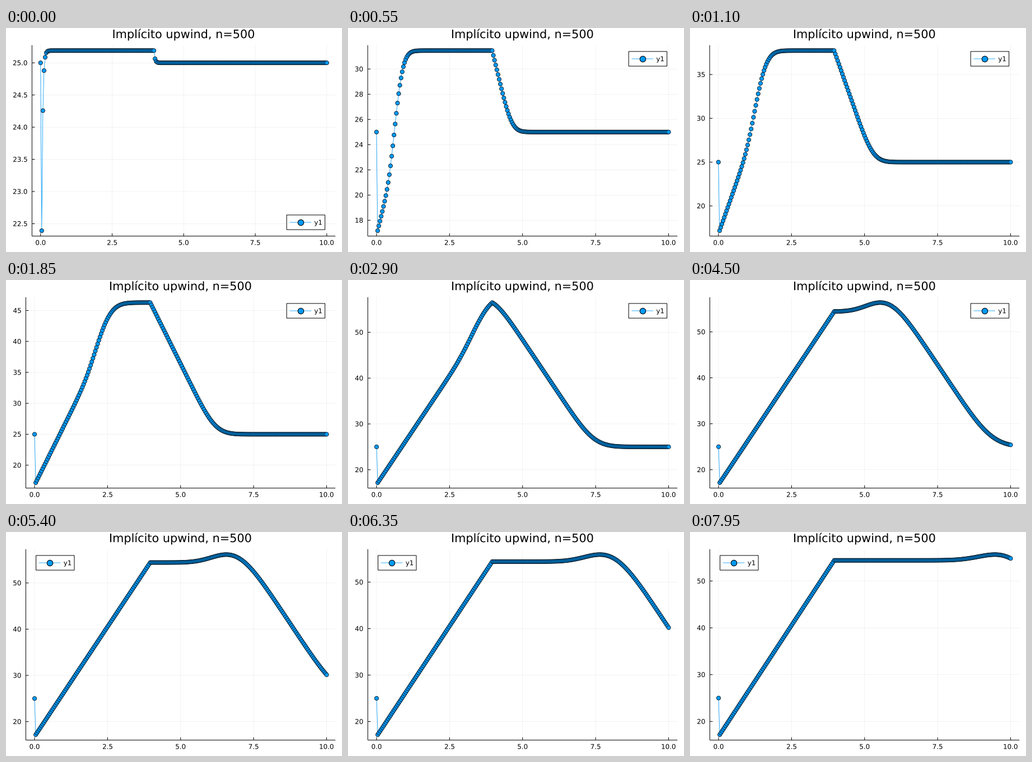
Animation of 600 by 400 pixels, one loop 8 s. Source, as a matplotlib script:

```python
import math
import numpy as np
import matplotlib.pyplot as plt
from matplotlib.animation import FuncAnimation
from matplotlib.collections import LineCollection
from matplotlib.patches import PathPatch, Rectangle
from matplotlib.path import Path
from matplotlib.textpath import TextPath

plt.rcParams["font.family"] = "DejaVu Sans"

W, H, DPI = 600, 400, 100
PX = 72 / DPI                       # points per pixel
FRAMES, INTERVAL, STRIDE = 160, 50, 3

# stage geometry in pixels, y pointing down
TOP, BOTTOM, RIGHT = 30.7, 371.6, 588.2
MARGIN = 21.65                      # left margin besides the widest label
BLUE = "#009AFA"
SMALL, LARGE = 11.87, 20.8

# implicit upwind scheme with a heated stretch x < 4
N, C, HEAT, T0 = 251, 0.5, 0.19, 25.0
x = np.linspace(0, 10, N)
source = np.where(np.arange(N) < 100, HEAT, 0.0)


def advance(u):
    rhs = u + source
    new = np.empty(N)
    prev = 0.0
    for i in range(N):
        prev = (rhs[i] + C * prev) / (1 + C)
        new[i] = prev
    new[0] = T0
    return new


def simulate():
    u, states = np.full(N, T0), []
    for step in range(STRIDE * (FRAMES - 1) + 1):
        u = advance(u)
        if step % STRIDE == 0:
            states.append(u)
    return states


def pick_ticks(lo, hi):
    """Choose 4 to 8 nice ticks, scored by count, coverage and niceness."""
    best = None
    for z in (1, 0, -1):
        for q, nice in ((1, 1.0), (5, 0.9), (2, 0.7), (2.5, 0.5), (3, 0.2)):
            step = q * 10.0 ** z
            ticks = np.arange(math.ceil(lo / step), math.floor(hi / step) + 1) * step
            n = len(ticks)
            if not 4 <= n <= 8:
                continue
            count = 1 - abs(n - 5) / 5
            cover = 1.5 * (hi - lo) / ((n - 1) * step)
            score = round(count / 4 + cover / 3 + nice / 4, 9)
            cells = math.ceil(hi / step) - math.floor(lo / step)
            if best is None or (score, -cells) > best[0]:
                best = ((score, -cells), ticks)
    ticks = best[1]
    whole = np.allclose(ticks, np.round(ticks))
    return ticks, [f"{t:.0f}" if whole else f"{t:.1f}" for t in ticks]


def legend_corner(fx, fy):
    """First free corner: top right, top left, bottom right."""
    right, left, high, low = fx >= 0.75, fx <= 0.25, fy >= 0.75, fy <= 0.25
    for name, inside in (("tr", right & high), ("tl", left & high), ("br", right & low)):
        if not inside.any():
            return name
    return "tr"


states = simulate()

fig = plt.figure(figsize=(W / DPI, H / DPI), dpi=DPI, facecolor="white")
ax = fig.add_axes([0, 0, 1, 1])
ax.set_xlim(0, W)
ax.set_ylim(H, 0)
ax.axis("off")


def ink_width(text):
    return TextPath((0, 0), text, size=SMALL).get_extents().width


def label():
    return ax.add_patch(PathPatch(Path([(0, 0)]), fc="black", lw=0, zorder=6))


def write(patch, text, px, base, align, size=SMALL):
    """Put text on a baseline; align 0, 0.5, 1 means left, centre, right."""
    glyphs = TextPath((0, 0), text, size=size)
    ink = glyphs.get_extents()
    shift = px - ink.x0 - align * ink.width
    patch.set_path(Path(glyphs.vertices * [1, -1] + [shift, base], glyphs.codes))


def segments(width, alpha, z):
    lines = LineCollection([], colors="black", linewidths=width * PX, alpha=alpha, zorder=z)
    lines.set_snap(False)
    return ax.add_collection(lines)


def dots(count, diameter, edge, z):
    return ax.scatter(np.zeros(count), np.zeros(count),
                      s=np.full(count, (diameter * PX) ** 2), c=BLUE,
                      edgecolors="black", linewidths=edge * PX, zorder=z)


def blue_line(z):
    line, = ax.plot([], [], color=BLUE, lw=0.8 * PX, zorder=z, snap=False)
    return line


grid = segments(0.5, 0.1, 1)
frame_lines = segments(1, 1, 2)
curve = blue_line(3)
points = dots(N, 7.2, 0.75, 4)

title = label()
x_ticks = np.linspace(0, 10, 5)
x_labels = [label() for _ in x_ticks]
y_labels = [label() for _ in range(8)]

BOX_W, BOX_H = 68.4, 26.2
box = ax.add_patch(Rectangle((0, 0), BOX_W, BOX_H, fc="white", ec="black",
                             lw=PX, zorder=5, snap=False))
key_line = blue_line(6)
key_dot = dots(1, 10.4, 1.1, 7)
key_text = label()


def place_legend(corner, left):
    bx = left + 18.2 if corner == "tl" else 501.2
    by = 333.9 if corner == "br" else 41.9
    mid = by + BOX_H / 2
    box.set_xy((bx, by))
    key_line.set_data([bx + 5.7, bx + 43.5], [mid, mid])
    key_dot.set_offsets([[bx + 24.6, mid]])
    write(key_text, "y1", bx + 49.5, mid + 4.3, 0)


def draw(k):
    u = states[k]
    pad = 0.03 * (u.max() - u.min())
    lo, hi = u.min() - pad, u.max() + pad
    ticks, names = pick_ticks(lo, hi)
    left = MARGIN + max(ink_width(name) for name in names)

    fx, fy = (x + 0.3) / 10.6, (u - lo) / (hi - lo)
    px = left + fx * (RIGHT - left)
    py = BOTTOM - fy * (BOTTOM - TOP)
    curve.set_data(px, py)
    points.set_offsets(np.column_stack([px, py]))

    tx = left + (x_ticks + 0.3) / 10.6 * (RIGHT - left)
    ty = BOTTOM - (ticks - lo) / (hi - lo) * (BOTTOM - TOP)
    grid.set_segments([[(a, TOP), (a, BOTTOM)] for a in tx]
                      + [[(left, b), (RIGHT, b)] for b in ty])
    frame_lines.set_segments([[(left, TOP), (left, BOTTOM)], [(left, BOTTOM), (RIGHT, BOTTOM)]]
                             + [[(a, BOTTOM), (a, BOTTOM - 5)] for a in tx]
                             + [[(left, b), (left + 5, b)] for b in ty])

    for patch, value, a in zip(x_labels, x_ticks, tx):
        write(patch, f"{value:.1f}", a, 387.4, 0.5)
    for patch in y_labels:
        patch.set_visible(False)
    for patch, name, b in zip(y_labels, names, ty):
        patch.set_visible(True)
        write(patch, name, left - 8.8, b + 4.3, 1)
    write(title, "Implícito upwind, n=500", (left + RIGHT) / 2, 18.1, 0.5, LARGE)
    place_legend(legend_corner(fx, fy), left)
    return []


anim = FuncAnimation(fig, draw, frames=FRAMES, interval=INTERVAL,
                     repeat=True, repeat_delay=0, blit=False)
plt.show()
```
